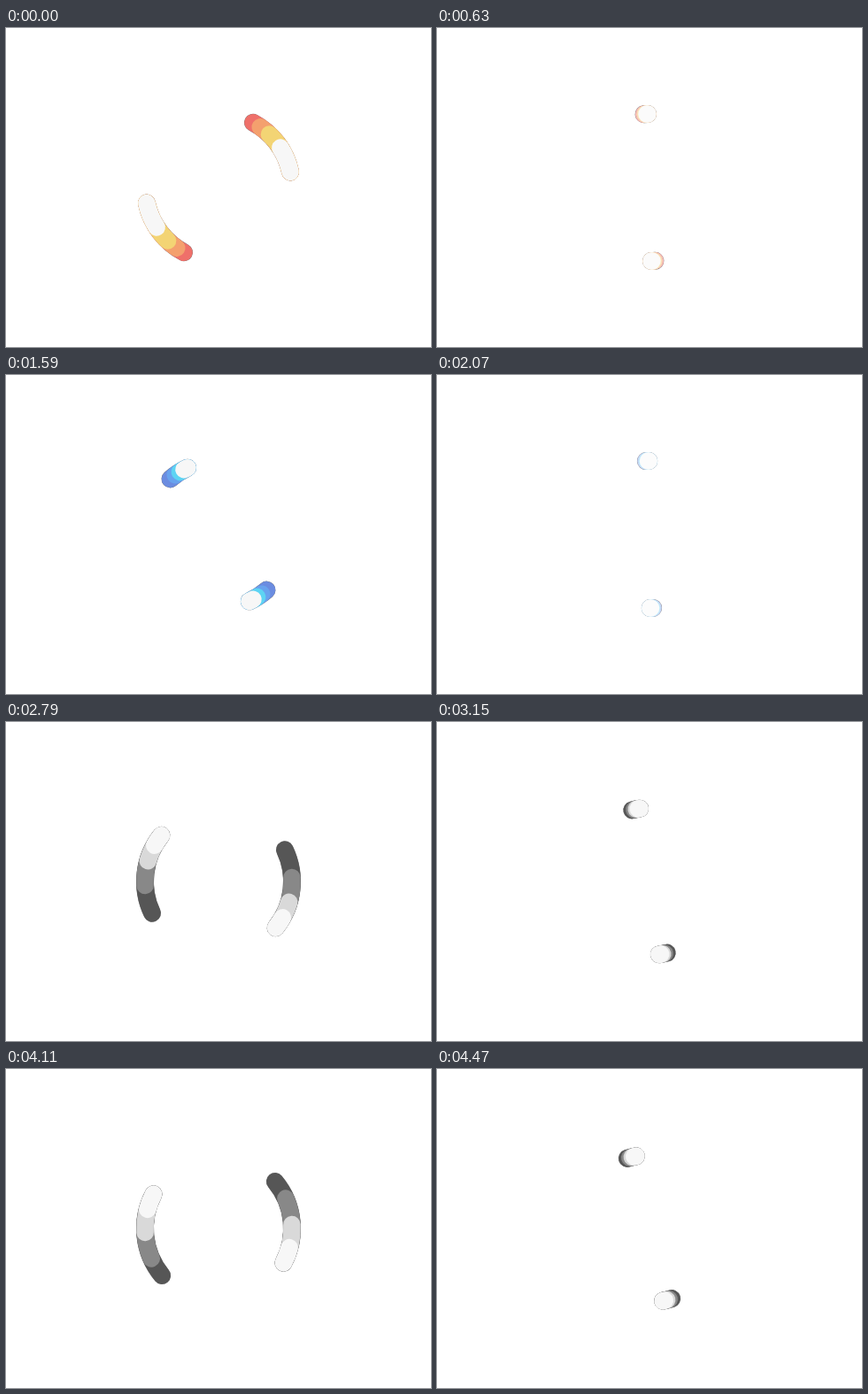
An HTML page for the animation above (4.5 s loop, 480x360 px).

```html
<!DOCTYPE html>
<html lang="en">
<head>
<meta charset="utf-8">
<title>Two orbiting trails</title>
<style>
html, body { margin: 0; width: 100%; height: 100%; overflow: hidden; background: #fff; }
svg { display: block; width: 100vw; height: 100vh; }
path { fill: none; stroke-linecap: round; stroke-width: 19.5; }
.rim { stroke: #777; stroke-width: 20; }
</style>
</head>
<body>
<svg viewBox="0 0 480 360">
  <g id="trail"></g>
  <use href="#trail" transform="rotate(180 240 180)"/>
</svg>
<script>
const LOOP = 4500, STEP = 30, RADIUS = 83;
const LAG = 26.5;                  // delay between trail layers, ms
const LEAD = 595;                  // how far the first swing is under way, ms
const FIRST = 1300, SECOND = 1400; // the two half turns, ms

// Trail colours from the tail towards the head
const HEAD = [247, 247, 247];
const WARM = [[239, 112, 106], [244, 160, 110], [243, 212, 116], HEAD];
const BLUE = [[107, 140, 224], [104, 163, 238], [94, 212, 243], HEAD];
const GRAY = [[86, 86, 86], [136, 136, 136], [217, 217, 217], HEAD];
const SETS = [WARM, BLUE, GRAY];

function bezier(p1, p2, s) {
  const r = 1 - s;
  return 3 * r * r * s * p1 + 3 * r * s * s * p2 + s * s * s;
}

// cubic-bezier(.8, 0, .1, .9), solved by bisection
function ease(x) {
  let lo = 0, hi = 1;
  for (let i = 0; i < 30; i++) {
    const mid = (lo + hi) / 2;
    if (bezier(0.8, 0.1, mid) < x) lo = mid; else hi = mid;
  }
  return bezier(0, 0.9, lo);
}

// Number of half turns done at time t
function swing(t) {
  const turn = FIRST + SECOND;
  const lap = Math.floor((t + LEAD) / turn);
  const ms = t + LEAD - lap * turn;
  const part = ms < FIRST ? ease(ms / FIRST) : 1 + ease((ms - FIRST) / SECOND);
  return 2 * lap + part;
}

function point(half) {
  const a = half * Math.PI;
  return `${240 + RADIUS * Math.sin(a)} ${180 - RADIUS * Math.cos(a)}`;
}

function arc(from, to) {
  return `M${point(from)}A${RADIUS} ${RADIUS} 0 0 1 ${point(Math.max(to, from + 0.001))}`;
}

const trail = document.getElementById("trail");

function addPath() {
  return trail.appendChild(document.createElementNS("http://www.w3.org/2000/svg", "path"));
}

const rim = addPath();
rim.setAttribute("class", "rim");
const layers = HEAD.concat(0).map(addPath);

function draw(t) {
  const head = swing(t), tail = swing(t - layers.length * LAG);
  const colors = SETS[Math.min(2, Math.floor(head))];
  const tint = Math.min(1, (head - tail) * 30); // fades to white when slow
  rim.setAttribute("d", arc(tail, head));
  layers.forEach((path, i) => {
    const rgb = colors[i].map(c => Math.round(255 + (c - 255) * tint));
    path.setAttribute("d", arc(swing(t - (layers.length - i) * LAG), head));
    path.setAttribute("stroke", `rgb(${rgb})`);
  });
}

const start = performance.now();

function frame(now) {
  const t = Math.max(0, now - start) % LOOP;
  draw(Math.floor(t / STEP) * STEP);
  requestAnimationFrame(frame);
}

draw(0);
requestAnimationFrame(frame);
</script>
</body>
</html>
```
